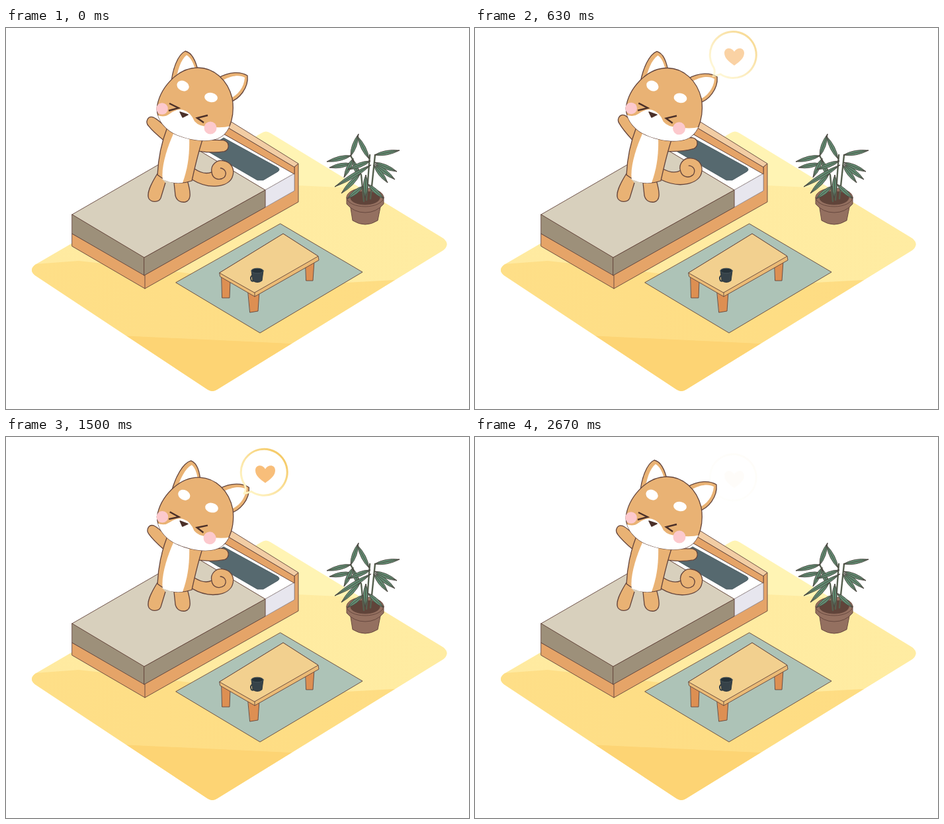
Animation, 700 px wide and 576 px high, one loop 2.7 s. Source, as an HTML page:

```html
<!DOCTYPE html>
<html lang="en">
<head>
<meta charset="utf-8">
<title>Happy dog on a bed</title>
<style>
  html, body { margin: 0; width: 100%; height: 100%; overflow: hidden; background: #fff; }
  svg { display: block; width: 100vw; height: 100vh; }
  .line { stroke: #63443c; stroke-width: .9; stroke-linejoin: round; stroke-linecap: round; }
  .fur { fill: #e9b274; stroke: #63443c; stroke-width: 1.3; stroke-linejoin: round; }
  .white { fill: #fff; }
  .wood { fill: #e5a468; }
  .leg { fill: #dd8f52; }
  .cloth { fill: #9d907a; }
  .pot { fill: #947060; }
  .leaf { fill: #618f74; stroke: #4c4640; stroke-width: .9; }
</style>
</head>
<body>
<svg viewBox="0 0 700 576">
  <defs>
    <clipPath id="floor">
      <path d="M386 159Q393 154 400 159L661 318Q672 327 661 336L320 546Q312 552 304 546L44 374Q34 366 44 358Z"/>
    </clipPath>
    <clipPath id="headClip"><use href="#headShape"/></clipPath>
    <linearGradient id="gold" x1="0" y1="1" x2="1" y2="0">
      <stop offset=".1" stop-color="#fff6c8"/>
      <stop offset=".45" stop-color="#fbe3a0"/>
      <stop offset="1" stop-color="#f3c252"/>
    </linearGradient>
    <linearGradient id="sun"><stop stop-color="#ffeaa0"/><stop offset="1" stop-color="#ffeca2"/></linearGradient>
    <linearGradient id="dusk"><stop stop-color="#fedf88"/><stop offset="1" stop-color="#fedc82"/></linearGradient>
  </defs>

  <g clip-path="url(#floor)">
    <path fill="#fff4b4" d="M0 140H700V576H0Z"/>
    <path fill="url(#sun)" d="M0 225L440 238L700 250V576H0Z"/>
    <path fill="url(#dusk)" d="M0 360L110 352L440 389L700 375V576H0Z"/>
    <path fill="#fdd474" d="M0 458L130 463L450 478L700 485V576H0Z"/>
  </g>

  <g class="line">
    <path class="wood" d="M100 311L210 373L436 246V210L442 205V263L210 394L100 330Z"/>
    <path d="M210 373V394"/>
    <path fill="#fff" d="M280 178L320 155L436 220L392 245Z"/>
    <path fill="#e7e6ee" stroke="#a39a9f" d="M392 245L436 220V246L392 271Z"/>
    <path class="wood" d="M320 141L436 210V221L320 155Z"/>
    <path fill="#f2cda4" d="M320 141L328 134L442 205L436 210Z"/>
    <path fill="#56696f" stroke="#46565c" d="M306 181L329 166L411 211Q415 214 411 217L389 230H380L306 187Z"/>
    <path fill="#d8d0bd" d="M100 282L280 178L392 245L209 347Z"/>
    <path class="cloth" d="M100 282L209 347V374L100 311Z"/>
    <path class="cloth" d="M209 347L392 245V271L209 374Z"/>

    <path fill="#adc3b7" d="M415 296L539 369L384 461L257 385Z"/>
    <path class="leg" d="M326 375L339 382L338 408L327 408Z"/>
    <path class="leg" d="M366 398H383L381 428L369 430Z"/>
    <path class="leg" d="M453 358L466 352L464 382L454 382Z"/>
    <path fill="#ebbb76" d="M323 370L419 311L472 345L473 351L376 406L324 376Z"/>
    <path fill="#f2d08f" d="M323 370L419 311L472 345L376 400Z"/>
    <path d="M376 400V406"/>
    <path fill="none" stroke="#333f46" stroke-width="2" d="M373 374Q368 376 371 382Q374 384 376 380"/>
    <path fill="#364249" stroke="#29343a" d="M371 367L373 382Q380 387 387 382L389 367Z"/>
    <ellipse cx="380" cy="367" rx="9" ry="3.8" fill="#27333a" stroke="#4a575c"/>

    <path class="pot" d="M520 266L524 291Q543 303 562 291L567 266Z"/>
    <path class="pot" d="M515 256V266Q526 279 543 279T571 266V256Z"/>
    <ellipse class="pot" cx="543" cy="256" rx="28" ry="14"/>
    <ellipse cx="543" cy="257" rx="22" ry="10" fill="#60443a"/>
    <path fill="none" stroke="#56604f" stroke-width="2.4" d="M541 262L537 222L521 193M545 260L550 192M551 258L558 192"/>
  </g>
  <g id="leaves"></g>

  <g id="dog">
    <g id="tail">
      <path class="fur" d="M284 212C295 220 304 221 311 218C309 207 319 199 328 201C341 203 347 214 342 226C336 240 308 246 281 229"/>
      <path class="fur" style="fill: none" d="M311 218C312 228 322 232 330 226C335 219 331 213 324 212"/>
    </g>
    <path class="fur" d="M229 220C219 236 212 250 216 258C220 264 231 264 234 257L241 234"/>
    <path class="fur" d="M254 234L256 253C258 262 265 264 271 263C280 261 280 250 274 230"/>
    <path id="armL" class="fur" d="M249 158C238 146 230 138 222 135C214 133 210 142 215 148C222 157 231 164 241 172"/>
    <path id="armR" class="fur" d="M293 169C308 170 320 169 329 170C339 173 338 184 330 187C316 189 303 188 291 186"/>
    <path class="fur" d="M244 150C235 173 230 200 229 222Q253 241 281 231C286 208 290 190 298 166Z"/>
    <path class="white" d="M253 160C243 182 234 212 237 229Q252 236 267 234C275 212 278 190 277 164Z"/>
    <g id="head">
      <g id="earL">
        <path class="fur" d="M249 90C251 62 260 40 271 35Q285 38 291 68Z"/>
        <path class="white" d="M256 86C259 64 264 48 273 41Q282 46 287 66Z"/>
      </g>
      <path class="fur" d="M320 76C338 65 356 66 365 72C367 90 353 108 338 112Z"/>
      <path class="white" d="M328 79C343 71 354 71 361 75C360 90 350 102 338 107Z"/>
      <path id="headShape" class="fur" d="M290 60C314 60 335 78 342 106C346 130 340 153 327 163C313 174 283 171 262 163C243 156 229 141 228 122C231 93 258 60 290 60Z"/>
      <path class="white" clip-path="url(#headClip)" d="M225 130Q238 137 247 130Q259 121 268 124Q279 127 285 141Q292 149 306 149Q326 152 340 148L332 180H260Z"/>
      <ellipse class="white" cx="267.5" cy="87.5" rx="9.5" ry="7.5" transform="rotate(25 267.5 87.5)"/>
      <ellipse class="white" cx="310" cy="105" rx="10" ry="7.2" transform="rotate(10 310 105)"/>
      <circle fill="#fcc9cd" cx="236" cy="122" r="8.8"/>
      <circle fill="#fcc9cd" cx="309" cy="151" r="9.5"/>
      <path fill="none" stroke="#4b3029" stroke-width="2.4" d="M247 114L261 121L246 125M305 132L289 136L299 143"/>
      <path fill="#4b3029" stroke="#4b3029" stroke-width="1.5" stroke-linejoin="round" d="M263 127L275 131L267 135Z"/>
    </g>
  </g>

  <g id="bubble">
    <path fill="none" stroke="url(#gold)" stroke-width="3" stroke-linejoin="round" d="M-31 18A35 35 0 1 1 -21 28Q-26 30 -32 31Q-28 25 -31 18Z"/>
    <path fill="#f8bd78" d="M0 15C-8 9 -15 4 -15 -4C-15 -12 -5 -14 0 -6C5 -14 15 -12 15 -4C15 4 8 9 0 15Z"/>
  </g>
</svg>
<script>
const get = id => document.getElementById(id);

// Each leaf: base x, base y, tip x, tip y.
const leaves = [
  [521, 194, 533, 160], [549, 198, 531, 163], [522, 193, 485, 202], [522, 205, 489, 211],
  [525, 197, 511, 226], [525, 200, 533, 224], [557, 192, 595, 185], [557, 203, 591, 217],
  [558, 206, 588, 229], [556, 207, 577, 234], [551, 201, 517, 214], [552, 207, 497, 240],
  [536, 220, 507, 250], [544, 222, 543, 257], [547, 236, 571, 258], [540, 239, 516, 258]
];
get("leaves").innerHTML = leaves.map(([x, y, tx, ty]) => {
  const dx = tx - x, dy = ty - y, k = 6.5 / Math.hypot(dx, dy);
  const bend = s => `${x + dx * .45 - s * dy * k} ${y + dy * .45 + s * dx * k}`;
  return `<path class="leaf" d="M${x} ${y}Q${bend(1)} ${tx} ${ty}Q${bend(-1)} ${x} ${y}L${tx} ${ty}"/>`;
}).join("");

const LOOP = 2700, STEP = 30, JUMP = 570, AXIS = 265.4, TAU = 2 * Math.PI;
const wave = u => (1 - Math.cos(TAU * u)) / 2;
const turn = (id, angle, x, y) => get(id).setAttribute("transform", `rotate(${angle} ${x} ${y})`);

function draw(now) {
  const t = Math.floor(now % LOOP / STEP) * STEP;

  // One full spin during the jump, seen as a horizontal flip.
  const p = Math.min(t / JUMP, 1);
  const flip = Math.cos(TAU * (1 - (1 - p) ** 1.27));
  const lift = -30 * Math.sin(Math.PI * p);
  get("dog").setAttribute("transform", `translate(${AXIS} ${lift}) scale(${flip} 1) translate(${-AXIS} 0)`);

  const wag = wave(t * 7 / LOOP - .08), sway = wave(t / LOOP);
  turn("armL", 9 * wag, 243, 165);
  turn("armR", -8 * wag, 296, 178);
  turn("tail", -6 * wag, 286, 222);
  turn("head", 2.5 * sway, 265, 130);
  turn("earL", 7 * sway, 270, 75);

  const y = 52.5 - 12 * Math.cos(TAU * (t - 530) / 1340);
  get("bubble").setAttribute("transform", `translate(392 ${y})`);
  get("bubble").setAttribute("opacity", Math.sin(Math.PI * t / LOOP));
}

const start = performance.now();
function frame() {
  draw(performance.now() - start);
  requestAnimationFrame(frame);
}
frame();
</script>
</body>
</html>
```
